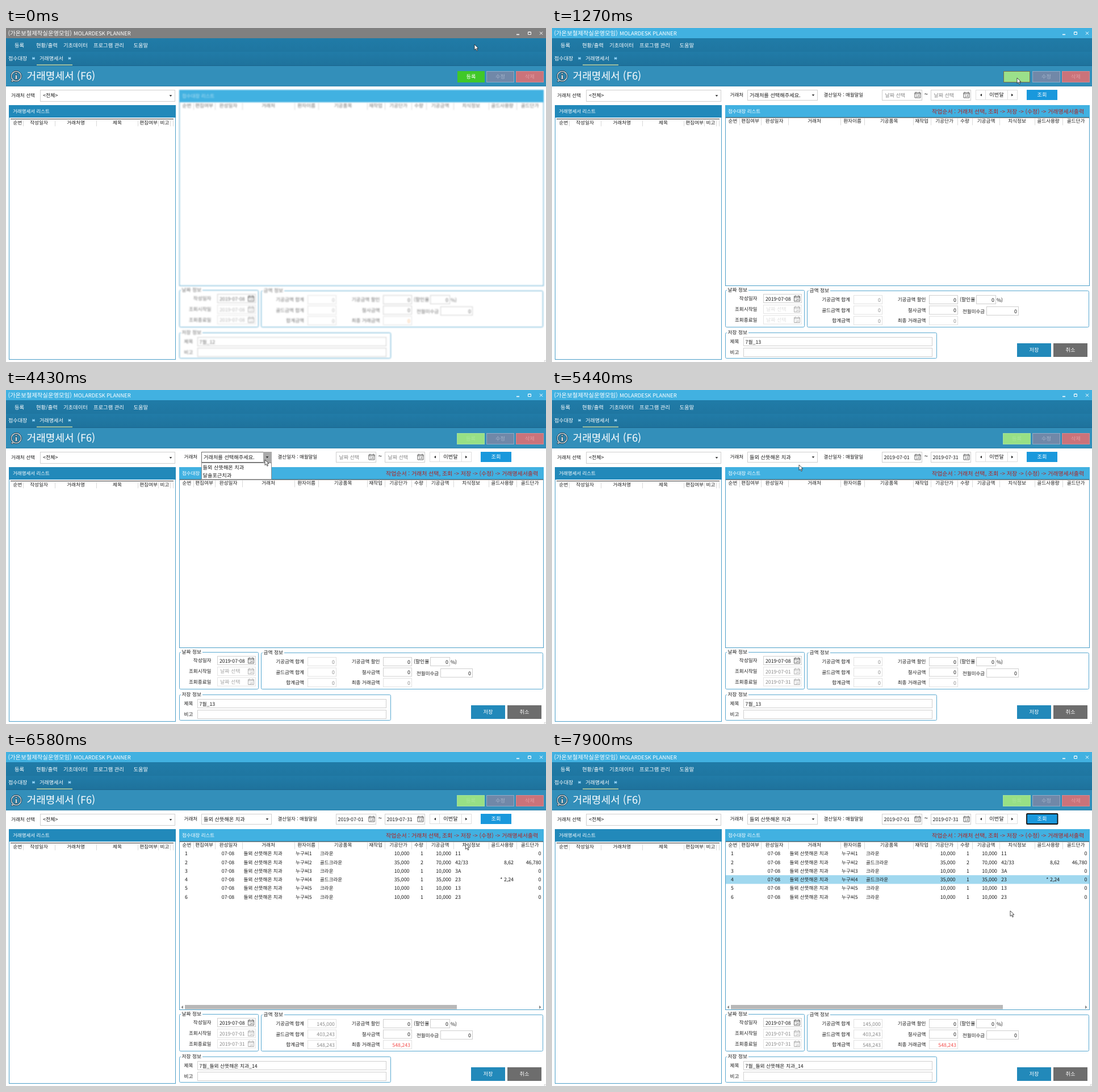
Recreate the animation shown at these times as an HTML page. Size 951 by 589 pixels, loop 7.99 s.

```html
<!DOCTYPE html>
<html lang="ko">
<head>
<meta charset="utf-8">
<style>
html, body { margin: 0; width: 100%; height: 100%; overflow: hidden; background: #fff; }
svg { display: block; width: 951px; height: 589px; }
text { font-family: "Noto Sans CJK KR", "Noto Sans CJK", "Noto Sans", sans-serif; text-rendering: geometricPrecision; white-space: pre; }
.off { filter: blur(.9px); }
.off text { opacity: .62; }
</style>
</head>
<body>
<svg id="stage" viewBox="0 0 951 589">
  <defs>
    <linearGradient id="bar" x2="0" y2="1">
      <stop offset="0" stop-color="#207ba7"/><stop offset=".48" stop-color="#1f76a1"/>
      <stop offset=".5" stop-color="#217ba7"/><stop offset="1" stop-color="#1e729c"/>
    </linearGradient>
  </defs>
</svg>
<script>
const LOOP = 7990, OPEN = 1270, PICK = 5440, LOAD = 5590;
const CLINIC = '들뫼 산뜻해온 치과';
const BLUE = '#2289ba', SKY = '#41b1e1', INK = '#1a1a1a', DIM = '#8a8a8a';
const stage = document.getElementById('stage');
const timed = [];
let parent = stage;

function add(tag, attrs, content) {
  const node = document.createElementNS('http://www.w3.org/2000/svg', tag);
  for (const key in attrs) node.setAttribute(key, attrs[key]);
  if (content !== undefined) node.textContent = content;
  return parent.appendChild(node);
}
function group(build) {
  const outer = parent, node = parent = add('g', {});
  build();
  parent = outer;
  return node;
}
// Content visible only from one time to another
function during(from, to, build) {
  timed.push({ node: group(build), from, to });
}
const fillBox = (x, y, w, h, fill) => add('rect', { x, y, width: w, height: h, fill });
const box = (x, y, w, h, stroke = '#cfcfcf', fill = '#fff', r = 0) =>
  add('rect', { x: x + .5, y: y + .5, width: w - 1, height: h - 1, rx: r, fill, stroke });
const path = (d, fill, stroke = 'none', width = 1) => add('path', { d, fill, stroke, 'stroke-width': width });
function text(x, y, value, { size = 8.7, fill = INK, align = 'start', weight = 400 } = {}) {
  return add('text', { x, y, 'font-size': size, fill, 'text-anchor': align, 'font-weight': weight }, value);
}
const mid = (x, y, value, o) => text(x, y, value, { align: 'middle', ...o });
const right = (x, y, value, o) => text(x, y, value, { align: 'end', ...o });
const downArrow = (x, y) => path(`M${x - 2.3} ${y - 1.2}h4.6l-2.3 2.6z`, '#222');

function button(x, y, w, h, label, fill, color = '#fff', border = fill, weight = 500) {
  box(x, y, w, h, border, fill);
  mid(x + w / 2, y + h / 2 + 3.3, label, { size: 9.2, fill: color, weight });
}
function calendar(x, y, color = '#555') {
  path(`M${x + .5} ${y + 1.5}h10v9h-10zM${x} ${y + 3.5}h11M${x + 2.5} ${y}v2M${x + 8.5} ${y}v2`, 'none', color, .9);
  mid(x + 5.5, y + 9.6, '14', { size: 6, fill: color });
}
function columns(y, cells, lines, height) {
  cells.forEach(([x, label]) => mid(x, y, label, { size: 8.6 }));
  lines.forEach(x => fillBox(x, y - 8, 1, height, '#d8d8d8'));
}
function fieldset(x, y, w, h, label, labelWidth) {
  box(x, y, w, h, '#58a8d0', 'none', 2);
  fillBox(x + 3, y - 2, labelWidth + 3, 5, '#fff');
  text(x + 4.5, y + 3.2, label);
}

function titleBar(color) {
  fillBox(0, 0, 951, 18, color);
  text(3.5, 12.8, '(가온보철제작실운영모임)', { size: 10.4, fill: '#fff' });
  text(119, 12.8, 'MOLARDESK PLANNER', { size: 9.5, fill: '#fff' });
  path('M899 11.5h5', 'none', '#fff', 1.6);
  path('M919.5 7h5v4.5h-5zM919.5 7.5h5M940 6.7l5 5m0-5l-5 5', 'none', '#fff');
}
function chrome() {
  during(0, 890, () => titleBar('#808080'));
  during(890, LOOP, () => titleBar(SKY));
  fillBox(0, 18, 951, 49, 'url(#bar)');
  [[15, '등록'], [53, '현황/출력'], [101, '기초데이터'], [154, '프로그램 관리'], [224.5, '도움말']]
    .forEach(([x, label]) => text(x, 33.5, label, { size: 9.3, fill: '#fff' }));
  [[4, '접수대장', 48.5], [59, '거래명세서', 112]].forEach(([x, label, close]) => {
    text(x, 56.7, label, { size: 9.1, fill: '#fff' });
    path(`M${close - 2} 51.5l4 4m0-4l-4 4M${close - 2.5} 53.5h5`, 'none', '#8fd0f5', 1.1);
  });
  fillBox(54, 64.5, 63, 1.3, '#dfeaa6');
  fillBox(0, 66, 951, 1, '#1b658c');
  fillBox(0, 67, 951, 35, '#338fba');
  fillBox(0, 102, 951, 1, '#287fa9');

  path('M9 95l2-5 5 4z', '#fff', '#1c3442', .8);
  add('circle', { cx: 18, cy: 85, r: 9.6, fill: '#fff', stroke: '#1c3442', 'stroke-width': 1 });
  add('circle', { cx: 18, cy: 85, r: 7.6, fill: '#2c83ac', stroke: '#1c3442', 'stroke-width': .8 });
  path('M16 83h3.3v5.5h1.2v1.5h-5v-1.5h1.2v-4h-.7zM16.5 79h2.6v2.5h-2.6z', '#fff', '#173442', .7);
  text(36.5, 91, '거래명세서 (F6)', { size: 18.1, fill: '#fff' });

  during(0, 580, () => button(795, 76, 48, 20, '등록', '#40c828'));
  during(580, 890, () => button(795, 76, 48, 20, '등록', '#dedede'));
  during(890, OPEN, () => {
    button(795, 76, 48, 20, '등록', '#dedede', '#fff', '#111');
    box(796, 77, 46, 18, '#111', 'none');
  });
  during(OPEN, 1355, () => button(795, 76, 47, 20, '', '#9be08a', '#fff', '#7c7048'));
  during(1355, LOOP, () => button(794, 76, 49, 20, '등록', '#98e085', '#a9e79a', '#a3dfa0'));
  button(846, 76, 49, 20, '수정', '#7188a8', '#a5b5cb', '#93abc6', 400);
  button(898, 76, 49, 20, '삭제', '#cb737a', '#e29ca2', '#d58a90', 400);
}
function leftPanel() {
  text(9, 122.3, '거래처 선택', { size: 8.6 });
  box(60, 109, 238, 21);
  text(65, 122.4, '<전체>', { size: 9 });
  downArrow(290, 119.5);
  box(5, 136, 294, 449, '#4c9fc8');
  fillBox(5, 136, 294, 22, BLUE);
  text(12, 149.8, '거래명세서 리스트', { size: 8.5, fill: '#fff' });
  fillBox(8, 160, 287, 1, '#333');
  columns(170.3, [[20.5, '순번'], [58, '작성일자'], [123, '거래처명'], [196, '제목'], [251, '편집여부'], [279.5, '비고']],
    [30, 86, 159, 232, 268, 289, 294], 11);
}

function searchBar() {
  fillBox(303, 104, 648, 31, '#fff');
  text(313.5, 121, '거래처', { size: 8.6 });
  box(344, 109, 124, 19);
  during(2743, 4740, () => box(344, 109, 124, 19, '#6a6a6a', 'none'));
  during(3970, 4740, () => fillBox(453, 109, 15, 19, '#a9a9a9'));
  during(OPEN, PICK, () => text(348, 121.6, '거래처를 선택해주세요.', { size: 9.2 }));
  during(PICK, LOOP, () => text(348, 121.6, CLINIC, { size: 9.2 }));
  downArrow(460, 118.5);
  text(478.5, 121, '결산일자 : 매월말일', { size: 8.5 });
  [[581, '2019-07-01'], [667, '2019-07-31']].forEach(([x, date]) => {
    box(x, 109, 71, 19);
    during(OPEN, PICK, () => text(x + 5.5, 121.6, '날짜 선택', { size: 9, fill: '#858585' }));
    during(PICK, LOOP, () => text(x + 3.5, 121.8, date, { size: 8.8 }));
    calendar(x + 57.5, 112.5);
  });
  text(655.5, 121, '~', { size: 12 });
  [[746, 18], [763, 40], [802, 18]].forEach(([x, w]) => box(x, 109, w, 18, '#dedede'));
  path('M757 115.8v4.8l-3-2.4zM809 115.8v4.8l3.2-2.4z', '#222');
  mid(783, 121.2, '이번달', { size: 9.2, weight: 500 });

  const hover = 6968, press = 7120, leave = 7820;
  during(OPEN, hover, () => button(836, 109, 54, 18, '조회', '#1998dc'));
  during(hover, leave, () => button(836, 109, 54, 18, '조회', '#dcdcdc'));
  during(leave, LOOP, () => button(836, 109, 54, 18, '조회', '#1998dc'));
  during(press, LOOP, () => add('rect', { x: 836, y: 109, width: 54.5, height: 18, rx: 1, fill: 'none', stroke: '#111', 'stroke-width': 1.8 }));
}

function tableHead() {
  fillBox(305, 136, 642, 22, SKY);
  text(310, 149.8, '접수대장 리스트', { size: 8.5, fill: '#fff' });
  during(OPEN, LOOP, () => {
    text(669, 151, '작업순서 : 거래처 선택, 조회 -> 저장 -> (수정) -> 거래명세서출력', { size: 9.95, fill: '#b3201f' });
    fillBox(306, 157.5, 640, 1, '#333');
  });
  columns(167.4, [[318.5, '순번'], [349, '편집여부'], [391.5, '완성일자'], [462, '거래처'], [529, '환자이름'], [593.5, '기공품목'],
    [651, '재작업'], [691, '기공단가'], [727, '수량'], [764.5, '기공금액'], [819, '치식정보'], [874, '골드사용량'], [922.5, '골드단가']],
    [330, 368, 416, 508, 550, 636, 667, 714, 740, 788, 850, 899], 12);
}
function tableRows() {
  const top = i => 171.5 + 15.25 * i;
  const glow = (i, from, to) => during(from, to, () => fillBox(306, top(i), 640, 15.3, '#a0d8ef'));
  glow(0, 6356, 6508);
  glow(1, 7820, 7900);
  glow(3, 7900, LOOP);
  const items = [
    ['1', '크라운', '10,000', '1', '10,000', '11', '', '0'],
    ['2', '골드크라운', '35,000', '2', '70,000', '42/33', '8,62', '46,780'],
    ['3', '크라운', '10,000', '1', '10,000', '3A', '', '0'],
    ['4', '골드크라운', '35,000', '1', '35,000', '23', '* 2,24', '0'],
    ['5', '크라운', '10,000', '1', '10,000', '13', '', '0'],
    ['5', '크라운', '10,000', '1', '10,000', '23', '', '0']
  ];
  items.forEach(([who, item, price, count, total, teeth, gold, goldPrice], i) => {
    const y = top(i) + 10.8;
    text(315, y, i + 1);
    mid(391, y, '07-08');
    text(418.5, y, CLINIC, { size: 8.6 });
    text(510, y, '누구씨' + who, { size: 8.6 });
    text(553, y, item, { size: 8.5 });
    [[710.5, price], [735, count], [784, total], [894, gold], [942.5, goldPrice]].forEach(([x, v]) => right(x, y, v, { size: 8.8 }));
    text(791, y, teeth, { size: 8.8 });
  });
  fillBox(315, 446, 479, 7.5, '#b8b8b8');
  path('M312 447v6l-3.5-3zM939 447v6l3.5-3z', '#888');
}

let fading;
function dateBox() {
  fieldset(305, 462, 140, 66, '날짜 정보', 35);
  [['작성일자', 469, '08'], ['조회시작일', 488, '01'], ['조회종료일', 506.5, '31']].forEach(([label, y, day], i) => {
    right(361.5, y + 11, label, { size: 8.6 });
    box(372, y, 68, 16, i ? '#e4e4e4' : '#cfcfcf');
    const date = d => text(376, y + 11.6, '2019-07-' + d, { size: 8.7, fill: i ? DIM : INK });
    during(0, OPEN, () => date('08'));
    if (i) during(PICK, LOOP, () => date(day));
    else during(OPEN, LOOP, () => date(day));
    calendar(426, y + 2.5, i ? '#a5a5a5' : '#555');
  });
  during(OPEN, PICK, () => {
    fading = group(() => [499, 517.7].forEach(y => text(377, y, '날짜 선택', { size: 9, fill: '#a3a3a3' })));
  });
}
function amountBox() {
  fieldset(449, 463, 497, 65, '금액 정보', 35);
  const amount = (x, y, w, fill = INK, total, totalFill = fill) => {
    box(x, y, w, 16, fill === DIM ? '#e2e2e2' : '#cfcfcf');
    const put = (v, color) => right(x + w - 3, y + 11.7, v, { size: 8.8, fill: color });
    if (!total) return put('0', fill);
    during(0, OPEN, () => put('0', totalFill === DIM ? DIM : '#f28a30'));
    during(OPEN, LOAD, () => put('0', DIM));
    during(LOAD, LOOP, () => put(total, totalFill));
  };
  [['기공금액 합계', '145,000', '기공금액 할인'], ['골드금액 합계', '403,243', '절사금액'], ['합계금액', '548,243', '최종 거래금액']]
    .forEach(([label, sum, other], i) => {
      const y = 471 + i * 18.5, last = i === 2;
      right(525, y + 11.3, label, { size: 8.6 });
      amount(531, y, 51, DIM, sum);
      right(658.5, y + 11.3, other, { size: 8.6, weight: last ? 500 : 400 });
      if (last) amount(664, y, 51, DIM, sum, '#f4504e');
      else amount(664, y, 51);
    });
  text(718, 482.4, '(할인율', { size: 8.8 });
  amount(747, 471, 35);
  text(783, 482.6, '%)');
  text(723, 503.4, '전월미수금', { size: 8.5 });
  amount(765, 491, 57);
}
function saveBox() {
  fieldset(305, 537, 373, 46, '저장 정보', 35);
  text(313.5, 556, '제목', { size: 8.6 });
  text(313.5, 575, '비고', { size: 8.6 });
  box(337, 545, 333, 16);
  box(337, 564, 333, 16);
  [[0, OPEN, '7월_12'], [OPEN, LOAD, '7월_13'], [LOAD, LOOP, `7월_${CLINIC}_14`]]
    .forEach(([from, to, name]) => during(from, to, () => text(340.5, 556.5, name, { size: 8.8 })));
}
function dropdown() {
  box(344, 128, 124, 30, '#8a8a8a');
  during(4890, PICK, () => fillBox(345, 129, 122, 14.5, '#a9dcf2'));
  text(346.5, 139.5, CLINIC, { size: 9.2 });
  text(346.5, 153.6, '달솔포근치과', { size: 9.2 });
}

chrome();
leftPanel();
let head;
const form = group(() => {
  during(0, OPEN, () => box(305, 109, 642, 346, '#58a8d0'));
  during(OPEN, LOOP, () => box(305, 136, 642, 319, '#4c9fc8'));
  head = group(tableHead);
  during(LOAD, LOOP, tableRows);
  dateBox();
  amountBox();
  saveBox();
});
during(OPEN, LOOP, () => {
  searchBar();
  button(819, 556, 60, 24, '저장', BLUE);
  button(883, 556, 60, 24, '취소', '#6d6d6d');
});
during(4430, PICK, dropdown);
path('M947 588l3-3v3z', '#d0d0d0');
const cursor = path('M0 0V9.6L2.3 7.5L3.9 11.2L5.5 10.5L3.9 6.9H7Z', '#fff', '#222', .8);

// Pointer moves: first step, last step, number of steps, destination, easing
const linear = p => p, smooth = p => p * p * (3 - 2 * p), easeIn = p => p ** 1.4, easeOut = p => 1 - (1 - p) ** 2;
const moves = [
  [190, 660, 7, 819, 88, smooth],
  [2050, 2820, 11, 447, 118, smooth],
  [2900, 2900, 1, 448, 125, linear],
  [3890, 4050, 3, 455, 122, linear],
  [4200, 4200, 1, 456, 123, linear],
  [4600, 4740, 3, 439, 127, linear],
  [4890, 5060, 3, 435, 132, easeOut],
  [5900, 6280, 6, 669, 171, easeIn],
  [6356, 6432, 2, 765, 174, linear],
  [6508, 6660, 3, 845, 152, easeOut],
  [6740, 7120, 6, 856, 120, easeOut],
  [7820, 7900, 2, 807, 280, linear]
];
function pointerAt(t) {
  let x = 825, y = 29;
  for (const [from, to, steps, toX, toY, ease] of moves) {
    if (t < from) break;
    const gap = (to - from) / Math.max(1, steps - 1);
    const step = gap ? Math.min(steps, Math.floor((t - from) / gap + 1e-6) + 1) : 1;
    const p = ease(step / steps);
    x += (toX - x) * p;
    y += (toY - y) * p;
  }
  return [x, y];
}

function render(t) {
  for (const { node, from, to } of timed) node.style.display = t >= from && t < to ? '' : 'none';
  const idle = t < OPEN;
  form.setAttribute('class', idle ? 'off' : '');
  head.setAttribute('transform', `translate(0 ${idle ? -27 : 0})`);
  fading.setAttribute('opacity', t < 1355 ? .35 : t < 1440 ? .7 : 1);
  cursor.setAttribute('transform', `translate(${pointerAt(t)})`);
}
const start = performance.now();
function tick() {
  render((performance.now() - start) % LOOP);
  requestAnimationFrame(tick);
}
tick();
</script>
</body>
</html>
```
